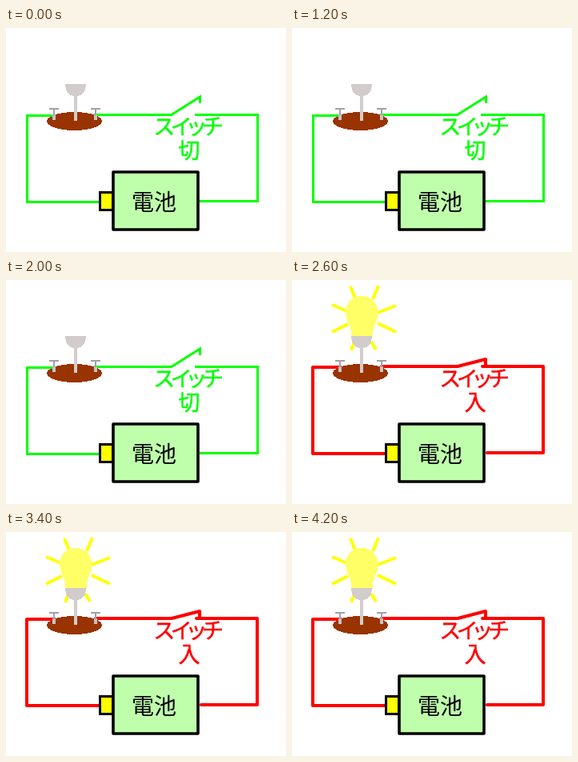
Write an HTML page that moves like this. It is 350 px wide and 280 px high and loops after 4400 ms.

```html
<!DOCTYPE html>
<html lang="ja">
<head>
<meta charset="utf-8">
<title>電池とスイッチ</title>
<style>
html, body { margin: 0; width: 100%; height: 100%; overflow: hidden; background: #fff; }
svg { display: block; width: 350px; height: 280px; }
text { font-family: "Noto Sans CJK JP", "Noto Sans CJK", sans-serif; }
.wire { fill: none; stroke-linejoin: round; }
.label { font-size: 27px; text-anchor: middle; stroke-width: .5; }
.kana { font-feature-settings: "palt"; letter-spacing: -3px; }
.crisp { shape-rendering: crispEdges; }
#off .wire, #off .label { stroke: #0f0; }
#off .wire { stroke-width: 3; stroke-linejoin: miter; }
#off .label { fill: #0f0; }
#on .wire, #on .label { stroke: #f00; }
#on .wire { stroke-width: 4; stroke-linecap: round; }
#on .label { fill: #f00; }
#on { opacity: 0; }
</style>
</head>
<body>
<svg viewBox="0 0 350 280">
  <defs>
    <g id="post" class="crisp">
      <path d="M-2 108V115H2V108Z" fill="#c4c4c8"/>
      <path d="M-6 101H6M0 101V109" stroke="#a0a0a8" stroke-width="2"/>
    </g>
  </defs>

  <ellipse class="crisp" cx="85.5" cy="116.5" rx="34.5" ry="11.5" fill="#930"/>

  <g id="off">
    <path class="wire" d="M61 109.5H26.5V217.5H117M110 108.5H207M236 108.5H314.5V216.5H241"/>
    <path class="wire" d="M206 109L242.5 86V94"/>
    <text class="label kana" x="226.500" y="133">スイッチ</text>
    <text class="label" x="229" y="163">切</text>
  </g>

  <g id="on">
    <path class="wire" d="M61 109H26V217H117M112 108H207L242 99V107M238 108H314V216H244"/>
    <path d="M73 8L79 23M108 7L101 24M130 32L107 41M130 65L107 54M50 31L69 39M50 65L70 55M74 88L78 77M105 87L99 77"
      fill="none" stroke="#ff0" stroke-width="4"/>
    <path class="crisp" d="M87 20C99 20 107.5 29 107.5 41C107.5 52 101 56 101 65V71H74V65C74 56 67 52 67 41C67 29 75 20 87 20Z" fill="#ff6"/>
    <text class="label kana" x="226.500" y="133">スイッチ</text>
    <text class="label" x="229" y="163">入</text>
  </g>

  <path class="crisp" d="M74 70H100C100 79 96 85 89 85V116H85V85C78 85 74 79 74 70Z" fill="#d2cccc"/>
  <use href="#post" x="60"/>
  <use href="#post" x="112"/>

  <rect x="117.5" y="205.5" width="16" height="22" fill="#ff0" stroke="#000" stroke-width="3"/>
  <rect x="134" y="180" width="106" height="72" fill="#bfffac" stroke="#000" stroke-width="3.6" stroke-linejoin="round"/>
  <text x="157" y="228" font-size="28">電池</text>
</svg>
<script>
const LOOP = 4400;
// The switch flips at each of these times, starting open.
const flips = [0, 600, 1200, 1400, 1600, 1800, 2000, 2600, 2800, 3400, 4000, 4200, LOOP];

function blink(id, startsVisible) {
  const frames = flips.map((t, i) => ({
    offset: t / LOOP,
    opacity: (i % 2 === 0) === startsVisible ? 1 : 0,
    easing: 'step-end'
  }));
  const anim = document.getElementById(id).animate(frames, { duration: LOOP, iterations: Infinity });
  anim.startTime = document.timeline.currentTime;
}

blink('off', true);
blink('on', false);
</script>
</body>
</html>
```
